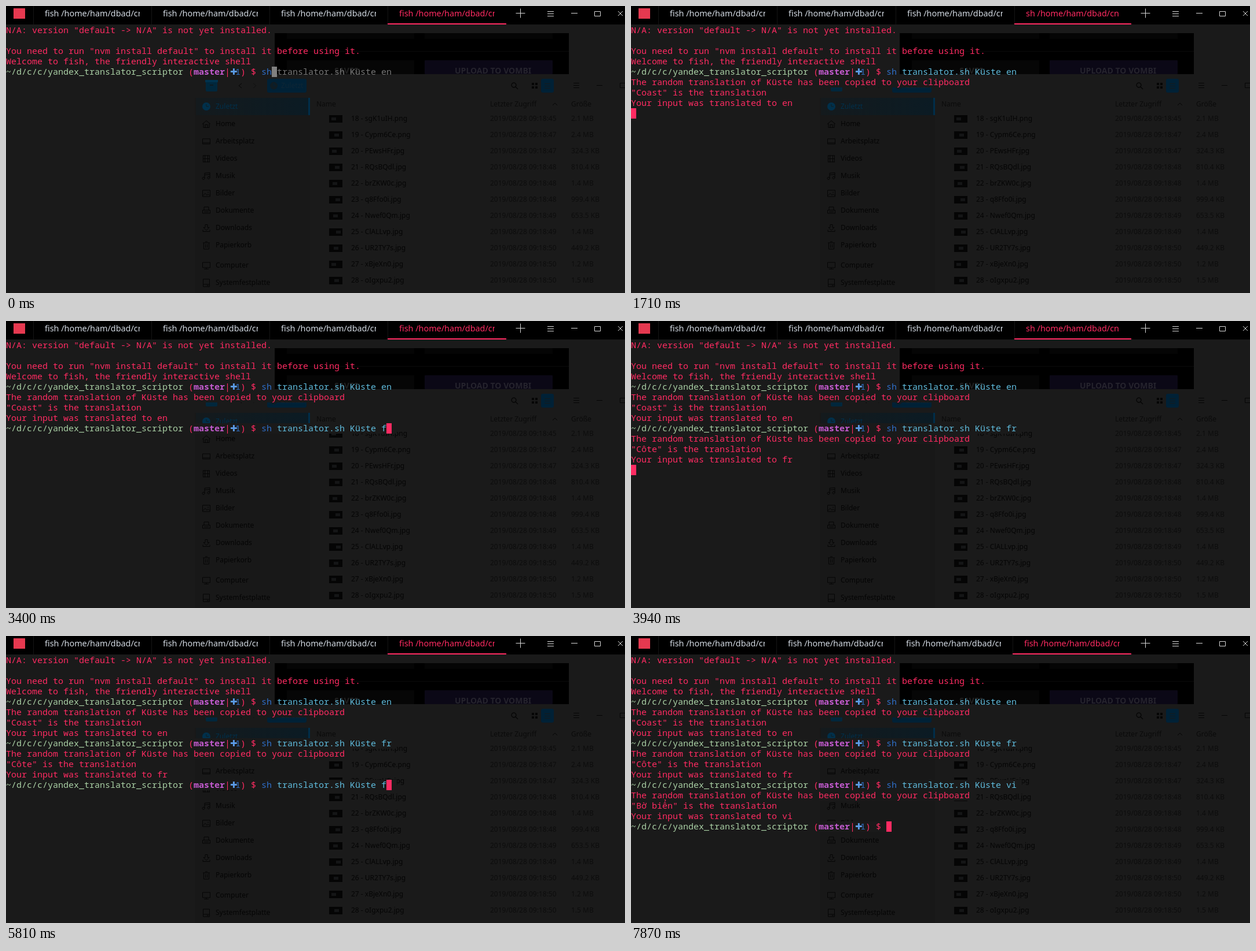
Write an HTML page with a canvas that moves like this. It is 1069 px wide and 497 px high and loops after 8000 ms.

```html
<!DOCTYPE html>
<html lang="de">
<head>
<meta charset="utf-8">
<title>Terminal</title>
<style>
  html, body { margin: 0; width: 100%; height: 100%; overflow: hidden; background: #1a1a1a; }
  canvas { display: block; }
</style>
</head>
<body>
<canvas id="stage" width="1069" height="497"></canvas>
<script>
const ctx = document.getElementById('stage').getContext('2d');
const LOOP = 8000, CELL = 9, LINE = 18, TOP = 33, PROMPT_END = 441;
const PINK = '#ff2b62', GRAY = '#777777', BACK = '#1a1a1a', INK = '#050505';
const SANS = '"Noto Sans", "Open Sans", sans-serif';
const MONO = '15px "Noto Sans Mono", "DejaVu Sans Mono", monospace';

function rect(x, y, w, h, color) {
  ctx.fillStyle = color;
  ctx.fillRect(x, y, w, h);
}

function text(str, x, y, color, font) {
  ctx.font = font;
  ctx.fillStyle = color;
  ctx.fillText(str, x, y);
}

function stroke(path, x, y, color, width = 1) {
  ctx.save();
  ctx.translate(x, y);
  ctx.strokeStyle = color;
  ctx.lineWidth = width;
  ctx.stroke(new Path2D(path));
  ctx.restore();
}

function disc(x, y, r, color) {
  ctx.fillStyle = color;
  ctx.beginPath();
  ctx.arc(x, y, r, 0, 7);
  ctx.fill();
}

function rounded(x, y, w, h, color, radius = 3) {
  ctx.fillStyle = color;
  ctx.beginPath();
  ctx.roundRect(x, y, w, h, radius);
  ctx.fill();
}

// ---- Dimmed windows behind the terminal ----

const SMALL = '12px ' + SANS;
const places = [
  ['Home', 'M-7 0L0-6L7 0M-5-1V6H5V-1M-2 6V1H2V6'],
  ['Arbeitsplatz', 'M-6.5-4.5H6.5V4.5H-6.5ZM-6 2.5H6'],
  ['Videos', 'M-5.5-6V6M5.5-6V6M-2.5-6V6M2.5-6V6M-5.5-5.5H5.5M-5.5 0H5.5M-5.5 5.5H5.5'],
  ['Musik', 'M-3 4V-5L6-6V3M-3-2L6-3M-3 4A2 2 0 1 1-3 3.9M6 3A2 2 0 1 1 6 2.9'],
  ['Bilder', 'M-6.5-5.5H6.5V5.5H-6.5ZM-6 4L-2 0L1 3L3 1L6 4M2-2H4'],
  ['Dokumente', 'M-4-1V-6.5H4V-1M-6.5-1H6.5V4.5H-6.5ZM-4 2H4'],
  ['Downloads', 'M-2-6V-1H-5L0 4L5-1H2V-6ZM-6 3V6H6V3'],
  ['Papierkorb', 'M-6-4.5H6M-2-6.5H2M-4.5-4V6.5H4.5V-4M-1.5-2V4M1.5-2V4'],
  ['Computer', 'M-6.5-5.5H6.5V3.5H-6.5ZM-4 6H4M0 4V6'],
  ['Systemfestplatte', 'M-5.5-6.5H5.5V6.5H-5.5ZM-5 2.5H5M1 4.5H4']
];
const files = [
  ['sgK1uIH.png', 45, '2.1 MB'], ['Cypm6Ce.png', 47, '2.4 MB'],
  ['PEwsHFr.jpg', 47, '324.3 KB'], ['RQsBQdl.jpg', 48, '810.4 KB'],
  ['brZKW0c.jpg', 48, '1.4 MB'], ['q8Ffo0i.jpg', 48, '999.4 KB'],
  ['Nwef0Qm.jpg', 49, '653.5 KB'], ['ClALLvp.jpg', 49, '1.4 MB'],
  ['UR2TY7s.jpg', 50, '449.2 KB'], ['xBjeXn0.jpg', 50, '1.2 MB'],
  ['oIgxpu2.jpg', 50, '1.5 MB']
];

function drawBrowser() {
  rect(464, 47, 508, 71, '#000');
  rect(485, 47, 220, 10, '#050505');
  rect(723, 47, 221, 10, '#050505');
  rect(464, 78, 508, 1, '#0b0b0b');
  rounded(485, 94, 220, 24, '#060606', 1);
  rounded(723, 94, 221, 24, '#0b0816', 1);
  const bold = 'bold 14px ' + SANS;
  text('SAVES', 567, 117, '#222', bold);
  text('UPLOAD TO VOMBI', 775, 117, '#25232d', bold);
}

function drawToolbar() {
  rounded(345, 130, 20, 18, '#00273c', 2);
  rect(344, 128, 22, 4, '#00324e');
  rect(352, 136, 6, 2, '#0d1a20');
  stroke('M3-4L-2 0L3 4', 404, 138, INK);
  stroke('M-2-4L3 0L-2 4', 429, 138, '#111');
  rounded(451, 126, 68, 24, '#002136');
  disc(462.5, 138, 6.5, '#101c23');
  stroke('M0-4V0H3', 462.5, 138, '#002136');
  text('Zuletzt', 475, 142, '#0e2635', SMALL);
  stroke('M3-1A4 4 0 1 1 3-1.1M2 2L6 6', 878, 138, INK, 1.3);
  for (const dx of [0, 6]) for (const dy of [0, 6]) rect(908 + dx, 133 + dy, 4, 4, INK);
  rounded(924, 126, 22, 24, '#002136');
  stroke('M-5-4H5M-5 0H5M-5 4H5', 935, 138.5, '#101c23', 1.5);
  stroke('M-5-4H5M-5 0H5M-5 4H5', 985, 137.5, INK);
  stroke('M-5 0H5', 1025, 137.5, INK);
  stroke('M-5-4H5V4H-5Z', 1065.5, 137.5, INK);
}

function drawSidebar() {
  rect(326, 159, 199, 338, '#181818');
  const glow = ctx.createLinearGradient(328, 0, 525, 0);
  glow.addColorStop(0, '#141a1d');
  glow.addColorStop(1, '#0b1b24');
  rect(328, 159, 194, 30, glow);
  rect(522, 159, 3, 30, '#002e4a');
  disc(346, 174, 7, '#00304b');
  stroke('M0-4V0H4', 346, 174, '#121a1e');
  text('Zuletzt', 362, 178, '#00304b', SMALL);
  places.forEach(([name, icon], i) => {
    const y = 204 + 30 * i + (i > 7 ? 5 : 0);
    stroke(icon, 346, y + .5, INK);
    text(name, 362, y + 4, INK, SMALL);
  });
}

function drawFiles() {
  text('Name', 536, 174, '#0b0b0b', SMALL);
  text('Letzter Zugriff', 836, 174, '#0b0b0b', SMALL);
  stroke('M-4 2L0-2L4 2', 948, 170, INK);
  text('Größe', 976, 174, '#0b0b0b', SMALL);
  files.forEach(([name, second, size], i) => {
    const y = 195 + 28 * i;
    rect(558, y - 6, 23, 13, '#050505');
    rect(562 + i * 5 % 9, y - 2, 8, 5, '#141516');
    text(`${18 + i} - ${name}`, 596, y + 4, INK, SMALL);
    text('2019/08/28 09:18:' + second, 836, y + 4, '#0d0d0d', SMALL);
    text(size, 976, y + 4, '#0d0d0d', SMALL);
  });
}

// ---- Terminal ----

function drawTabs(running) {
  rect(0, 0, 1069, 32, '#000');
  rect(13, 4, 20, 18, '#e63950');
  const step = running ? 205 : 204;
  for (let i = 0; i < 4; i++) {
    const x = 47 + step * i, active = i === 3;
    rect(x, 0, 1, 32, '#151515');
    ctx.save();
    ctx.beginPath();
    ctx.rect(x + 20, 0, active ? 844 - x - 20 : step - 40, 30);
    ctx.clip();
    const shell = active && running ? 'sh' : 'fish';
    text(shell + ' /home/ham/dbad/cnchi', x + 20, 18, active ? PINK : '#d3dae3', '14.4px ' + SANS);
    ctx.restore();
    if (active) rect(x, 30, 864 - x, 2, PINK);
  }
  const light = '#d8d8d8';
  stroke('M-8 0H8M0-8V8', 888.5, 12.5, light);
  stroke('M-5-4H6M-5 0H6M-5 4H6', 940, 13.5, light);
  stroke('M-5 0H6', 976 + 5, 12.5, light);
  stroke('M-5-4H5V4H-5Z', 1021.5, 13.5, light);
  stroke('M-4-4L4 4M4-4L-4 4', 1061, 13, light);
}

const print = (str, x, row, color = PINK, weight = '') =>
  text(str, x, TOP + row * LINE + 14, color, weight + MONO);

const cover = (row, width) => rect(0, TOP + row * LINE, width, LINE, BACK);

function drawPrompt(row) {
  print('~/d/c/c/yandex_translator_scriptor', 0, row, '#a9cfa4');
  print('(', 315, row);
  print('master', 324, row, '#c45bd0', 'bold ');
  print('|', 378, row);
  print('1', 396, row, '#2f6fc4');
  text('✚', 387, TOP + row * LINE + 14, '#5b9be6', '15px "DejaVu Sans", sans-serif');
  print(') $', 405, row);
}

function drawCommand(command, row, suggested) {
  print(command.slice(0, 2), PROMPT_END, row, '#2f6fc9');
  print(command.slice(3), PROMPT_END + 3 * CELL, row, suggested ? GRAY : '#5fbbdc');
}

const BASE = 'sh translator.sh Küste ';
// Each run: when the prompt, the enter key and the output come, and the edits of the last word.
const runs = [
  { prompt: 0, enter: 1300, output: 1710, word: 'Coast', edits: [[0, 'en']] },
  { prompt: 1760, enter: 3690, output: 3940, word: 'Côte',
    edits: [[2550, 'en'], [3120, 'e'], [3260, ''], [3400, 'f'], [3550, 'fr']] },
  { prompt: 3980, enter: 6710, output: 7070, word: 'Bờ biển',
    edits: [[4510, 'fr'], [4820, 'f'], [5400, 'fi'], [5810, 'f'], [5960, ''], [6090, 'v'], [6230, 'vi']] },
  { prompt: 7120, enter: LOOP, output: LOOP, word: '', edits: [] }
];
const ACCEPTED = 620;
const cursorOff = [[100, 580], [1200, 1250], [1850, 2460], [4230, 4460], [7250, 7870]];

function drawRun(run, index, t) {
  const row = 4 + 4 * index;
  const edit = run.edits.filter(([at]) => at <= t).pop();
  const suggested = t < ACCEPTED;
  if (index) cover(row, edit ? 675 : 450);
  drawPrompt(row);
  let cursor = { x: PROMPT_END, row, color: suggested ? '#808080' : PINK };
  if (edit) {
    const command = BASE + edit[1];
    drawCommand(command, row, suggested);
    cursor.x += CELL * (suggested ? 2 : command.length);
  }
  if (t >= run.enter) cursor = { x: 0, row: row + 1, color: PINK };
  if (t >= run.output) {
    const lines = [
      'The random translation of Küste has been copied to your clipboard',
      `"${run.word}" is the translation`,
      'Your input was translated to ' + edit[1]
    ];
    lines.forEach((line, i) => {
      cover(row + 1 + i, line.length * CELL);
      print(line, 0, row + 1 + i);
    });
    cursor.row = row + 4;
  }
  return cursor;
}

function draw(t) {
  rect(0, 0, 1069, 497, BACK);
  drawBrowser();
  drawToolbar();
  drawSidebar();
  drawFiles();
  drawTabs(runs.some(run => t >= run.enter && t < (run.output === 3940 ? 3980 : run.output + 50)));

  print('N/A: version "default -> N/A" is not yet installed.', 0, 0);
  print('You need to run "nvm install default" to install it before using it.', 0, 2);
  print('Welcome to fish, the friendly interactive shell', 0, 3);

  let cursor;
  runs.forEach((run, i) => { if (t >= run.prompt) cursor = drawRun(run, i, t); });
  if (!cursorOff.some(([from, to]) => t >= from && t < to))
    rect(cursor.x, TOP + cursor.row * LINE, CELL, LINE, cursor.color);
}

const start = performance.now();
function frame() {
  draw((performance.now() - start) % LOOP);
  requestAnimationFrame(frame);
}
frame();
</script>
</body>
</html>
```
